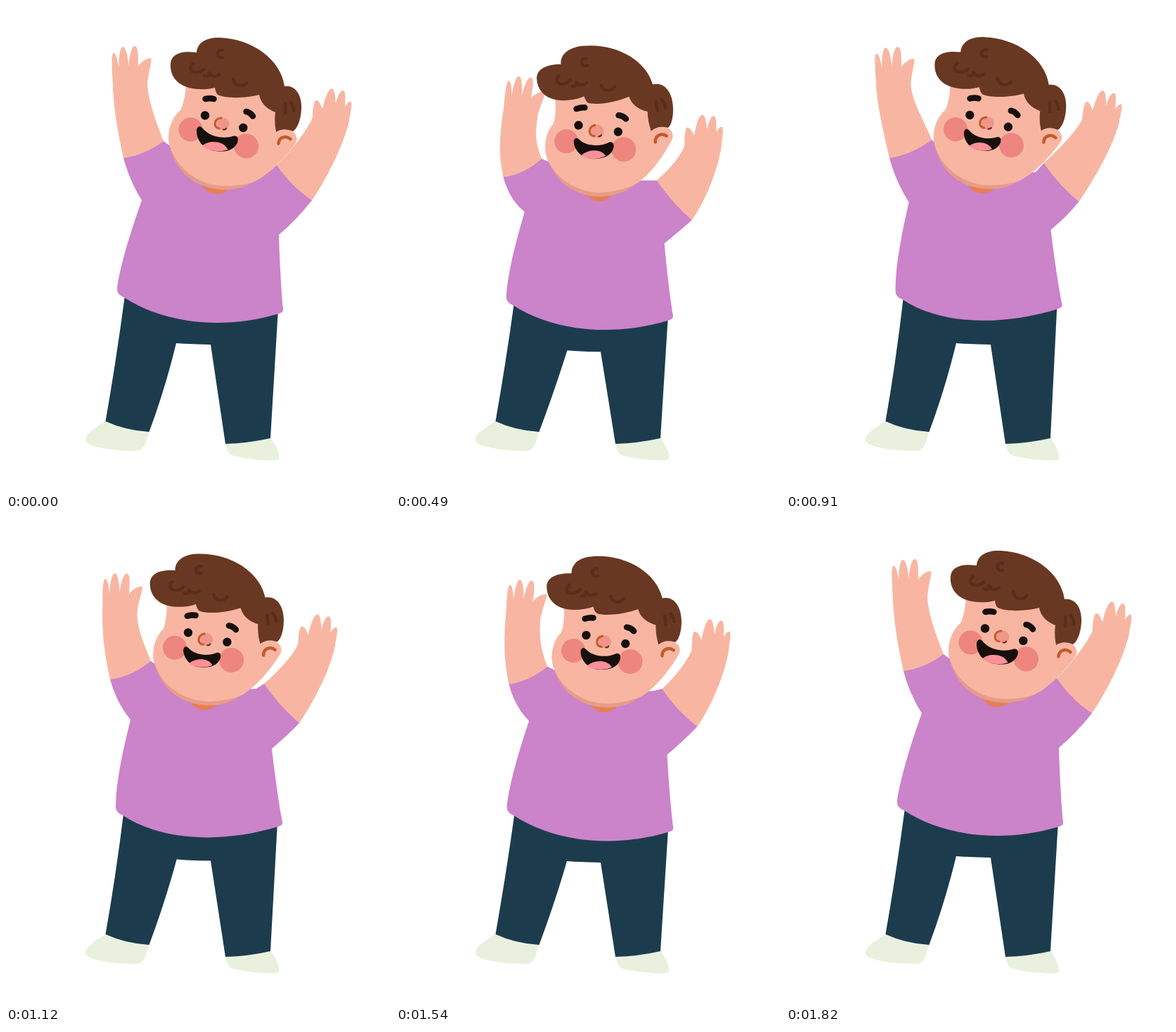
These frames come from a looping animation (546 px wide and 689 px high, 1890 ms). An HTML page:

```html
<!DOCTYPE html>
<html lang="en">
<head>
<meta charset="utf-8">
<title>Cheering boy</title>
<style>
  html, body { margin: 0; width: 100%; height: 100%; overflow: hidden; background: #fff; }
  svg { display: block; width: 546px; height: 689px; }
  .skin { fill: #f8b6a2; }
  .shirt { fill: #cb83ca; }
  .pants { fill: #1c3c4e; }
  .shoe { fill: #e9f1de; }
  .hair { fill: #693822; }
  .cheek { fill: #ee857f; }
  .ink { fill: #160f0c; }
  .line { fill: none; stroke-linecap: round; stroke-linejoin: round; }
  .curl { stroke: #5a2d19; stroke-width: 4.5; }
  .brow { stroke: #160f0c; stroke-width: 8.5; }
  .rust { stroke: #c35b2b; }
</style>
</head>
<body>
<svg viewBox="0 0 546 689">
  <path class="shoe" d="M142 589C130 598 113 606 113 617C114 626 150 632 185 632C197 632 199 620 204 603Z"/>
  <path class="shoe" d="M312 620Q314 634 320 638C340 644 375 647 386 645C392 641 386 628 376 613Z"/>
  <path class="pants" id="pants"/>
  <path class="skin" id="armL"/>
  <path class="skin" id="handL" d="M152 110C151 95 149 68 152.5 66.5C157 66 159 80 160.5 87C160 75 162 58 166 58C171 58 174 75 174.5 86C175 75 178 57 183 57C189 57 188 75 188 86C191 80 203 72 206.5 75C207.5 78 203 92 201 110V120H152Z"/>
  <path class="skin" id="armR"/>
  <path class="skin" id="handR" d="M436 165C435 155 437 134 441 134C446 134 448 143 450 146C452 138 457 118 463 117.5C468 117 468 130 469 138C471 130 475 120 479 120C484 120 482 135 482 143C485 138 488 135 490.5 136C493 140 489 155 486 172Z"/>
  <path class="shirt" id="shirt"/>
  <g id="head">
    <path fill="#e87f50" d="M277 252Q286 267 299 267Q311 267 320 258Z"/>
    <path fill="#e79c89" d="M231 187C235 230 265 262 315 261C335 260 345 254 353 249L300 200Z"/>
    <path class="skin" d="M256 110C255 124 253 139 248 148C238 156 231 171 231 187C232 218 265 255 310 255.500C328 256 343 253 353 249.500C373 240 395 218 411 196C418 186 409 175 397 175H390V110Z"/>
    <path class="line rust" stroke-width="4.500" d="M387.500 195.500C388 186 398 183.500 404.500 189"/>
    <path class="hair" d="M234 82C235 68 250 63 271 66C272 52 285 44 305 45C350 47 391 76 396 114C411 112 421 126 420 146C419 166 412 176 408 178Q395 172 384 179Q381 164 383 151Q363 143 360 126C342 131 313 132 301 126Q298 123 297 116C283 120 262 119 250 112C239 106 233 95 234 82Z"/>
    <g class="line curl">
      <path d="M308 63C298 61 298 75 308 73"/>
      <path d="M266 82C259 87 263 95 270 94Q277 94 281 90"/>
      <path d="M282 99Q288 102 289 95Q294 103 303 98"/>
      <path d="M323 104Q325 113 333 113Q339 113 342 109"/>
      <path d="M397 139V152M405 137Q409 142 409 149"/>
    </g>
    <circle class="cheek" cx="262.500" cy="175.500" r="17"/>
    <circle class="cheek" cx="341.500" cy="199" r="17.500"/>
    <circle class="ink" cx="283" cy="155.500" r="6.200"/>
    <circle class="ink" cx="337.300" cy="173" r="6.200"/>
    <path class="line brow" d="M283.500 132Q290 130.500 295.500 132"/>
    <path class="line brow" d="M341.500 150Q347 151 351 156.500"/>
    <circle fill="#f0958a" cx="308.500" cy="167.500" r="9"/>
    <path class="line rust" stroke-width="3.200" d="M306 159C296 159 294 173 303 174"/>
    <path class="line" stroke="#6b2a1c" stroke-width="2.200" d="M309 175.500Q312 176 313 174"/>
    <g id="mouth">
      <path class="ink" d="M271 178C271 172 275 169 279 173C288 185 308 190 324 184.500C331 184 331 191 328 196C323 205 312 208 298 206C281 204 271 191 271 178Z"/>
      <path fill="#fd8f98" d="M279 198.500C287 191 309 190 315.500 204C308 207 291 208 279 198.500Z"/>
    </g>
  </g>
</svg>
<script>
const STEP = 70, STEPS = 27, HALF = 13;
const el = id => document.getElementById(id);
const start = performance.now();

// Each row holds the same values for the right, left and low key poses.
const poses = {
  head: [[310, 164.5, 0], [288.5, 163.6, -0.7], [288.7, 174.5, -8.6]],
  handL: [[176.75, 64.5, 0], [152.5, 65.5, -0.8], [186, 108.5, 9]],
  handR: [[468.25, 127, 0], [455, 130, 2], [441.6, 164.2, -3.5]],
  outL: [[167, 216], [147, 216], [153.7, 243.5]],
  inL: [[224, 192], [207.3, 190.3], [208, 217.4]],
  inR: [[385, 226], [366.4, 223.3], [371.8, 248.2]],
  outR: [[435, 276], [416.4, 278], [421.8, 304.5]],
  pitL: [[193, 276], [174.7, 278.8], [184, 292.5]],
  pitR: [[388, 325], [376.5, 318], [382.3, 338]],
  hemL: [[158, 408], [155.7, 411], [157, 419.3]],
  hemR: [[394, 433], [392.5, 426.4], [394, 443]],
  shoulder: [[370, 237], [355, 236], [359, 248]],
  neck: [[290, 240], [271, 241], [284, 250]]
};

const add = (p, x, y) => [p[0] + x, p[1] + y];
const between = (p, q, k, x) => [p[0] + (q[0] - p[0]) * k + x, p[1] + (q[1] - p[1]) * k];
const path = (...parts) =>
  parts.map(v => Array.isArray(v) ? v.map(n => n.toFixed(2)).join(" ") : v).join(" ");
const ramp = (x, a, b) => {
  const k = Math.min(1, Math.max(0, (x - a) / (b - a)));
  return k * k * (3 - 2 * k);
};

// Moves a point of a rigid part from its rest pose to the current one.
function carry(name, now, x, y) {
  const [ox, oy] = poses[name][0], [nx, ny, deg] = now[name];
  const c = Math.cos(deg * Math.PI / 180), s = Math.sin(deg * Math.PI / 180);
  return [nx + (x - ox) * c - (y - oy) * s, ny + (x - ox) * s + (y - oy) * c];
}

function place(name, now) {
  const [ox, oy] = poses[name][0], [x, y, deg] = now[name];
  el(name).setAttribute("transform", `translate(${x} ${y}) rotate(${deg}) translate(${-ox} ${-oy})`);
}

function draw(step) {
  const sway = (1 - Math.cos(Math.PI * step / HALF)) / 2;
  const dip = (1 - Math.cos(2 * Math.PI * step / HALF)) / 2;
  const now = {};
  for (const [name, [right, left, low]] of Object.entries(poses))
    now[name] = right.map((v, i) => v * (1 - sway - dip / 2) + left[i] * (sway - dip / 2) + low[i] * dip);
  const { outL, inL, inR, outR, pitL, pitR, hemL, hemR, shoulder, neck } = now;
  const set = (id, ...parts) => el(id).setAttribute("d", path(...parts));
  const left = (x, y) => carry("handL", now, x, y);
  const right = (x, y) => carry("handR", now, x, y);

  ["head", "handL", "handR"].forEach(name => place(name, now));

  set("armL", "M", left(151.7, 105), "C", left(152, 140), add(outL, -8, -36), outL,
    "L", add(outL, 15, 15), add(inL, 5, 12), inL,
    "C", add(inL, -10, -26), left(202, 135), left(201, 110), "Z");
  set("armR", "M", right(436, 158), "C", right(430, 175), add(inR, 14, -12), inR,
    "L", add(inR, -2, 14), add(outR, -15, 8), outR,
    "C", add(outR, 20, -29), right(482, 195), right(488.3, 160), "Z");

  set("shirt", "M", outL, "Q", add(outL, 30, -4), inL, "L", neck, shoulder, inR,
    "Q", add(inR, 21, 31), outR, "Q", add(pitR, 24, -20), pitR,
    "C", between(pitR, hemR, 0.35, -1), between(pitR, hemR, 0.75, -1), add(hemR, 0, -3),
    "Q", add(hemR, 1, 2), add(hemR, -6, 4),
    "C", add(hemR, -84, 27.5), add(hemL, 67, 43.5), add(hemL, 10, 6),
    "Q", add(hemL, -1, 2), add(hemL, 0, -8),
    "C", between(pitL, hemL, 0.68, -6), between(pitL, hemL, 0.35, -4), pitL,
    "Q", add(outL, 9, 33), outL, "Z");

  const crotch = 479 + 10.3 * dip;
  set("pants", "M", add(hemL, 12, -4), "L", add(hemR, -7, -3), [376, 614],
    "Q", [345, 621], [312, 622], "L", [291, crotch + 2],
    "Q", [266, crotch + 2], [242 + 1.5 * dip, crotch],
    "Q", [226, 545], [203.5, 605], "Q", [170, 603], [141.5, 590],
    "Q", [157, 502], add(hemL, 12, -4), "Z");

  const purse = ramp(step, 4, 10) - ramp(step, 18, 26);
  el("mouth").setAttribute("transform",
    `translate(301 ${189 + 2 * purse}) scale(${1 - 0.11 * purse}) translate(-301 -189)`);
}

function tick() {
  draw(Math.floor((performance.now() - start) / STEP) % STEPS);
  requestAnimationFrame(tick);
}
tick();
</script>
</body>
</html>
```
